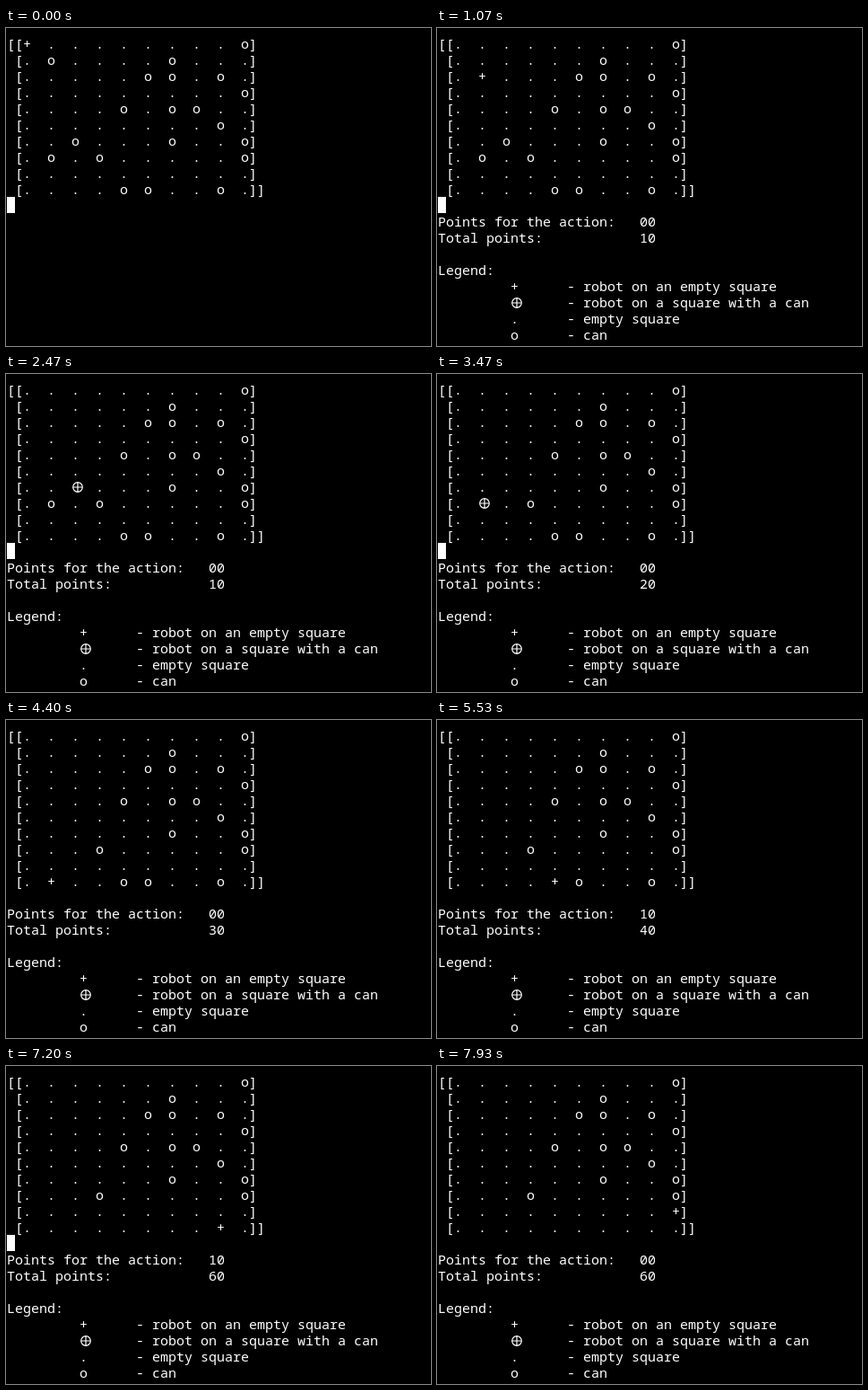
An HTML page with a canvas for the animation above (8 s loop, 474 by 354 pixels).

```html
<!DOCTYPE html>
<html lang="en">
<head>
<meta charset="utf-8">
<title>Can collecting robot</title>
<style>
html, body { margin: 0; width: 100%; height: 100%; overflow: hidden; background: #000; }
canvas { display: block; }
</style>
</head>
<body>
<canvas id="stage" width="474" height="354"></canvas>
<script>
const ctx = document.getElementById('stage').getContext('2d', { alpha: false });
const LOOP = 8000, CELL = 9, LINE = 18, LEFT = 1, TOP = 8, SIZE = 10;

// Columns holding a can, one string per grid row
const CANS = ['9', '16', '568', '9', '467', '8', '269', '139', '', '458'];

// Right, left, down, up or pick, each with its start time
const ACTIONS = 'RDPDDDDDRPDLPDDRRRPRPRRRPRU';
const TIMES = [130, 400, 870, 1070, 1330, 1670, 1930, 2200, 2470,
  2730, 3000, 3270, 3530, 3800, 4130, 4670, 4930, 5200, 5470,
  5730, 6000, 6270, 6530, 6800, 7070, 7330, 7600];
const MOVES = { R: [0, 1], L: [0, -1], D: [1, 0], U: [-1, 0] };

function stateAt(t) {
  const cans = CANS.map(row => new Set([...row].map(Number)));
  let row = 0, col = 0, points = 0, total = 0;
  for (let i = 0; i < TIMES.length && TIMES[i] <= t; i++) {
    const action = ACTIONS[i];
    points = 0;
    if (action === 'P') {
      cans[row].delete(col);
      points = 10;
      total += points;
    } else {
      row += MOVES[action][0];
      col += MOVES[action][1];
    }
  }
  return { cans, row, col, points, total };
}

function print(text, row, col) {
  [...text].forEach((ch, i) => {
    const x = LEFT + (col + i) * CELL;
    if (ch === '⊕') robotOnCan(x + 7, TOP + row * LINE + 10);
    else if (ch !== ' ') ctx.fillText(ch, x, TOP + row * LINE + 15);
  });
}

function robotOnCan(x, y) {
  ctx.beginPath();
  ctx.arc(x, y, 5.3, 0, Math.PI * 2);
  ctx.moveTo(x - 5, y);
  ctx.lineTo(x + 5, y);
  ctx.moveTo(x, y - 5);
  ctx.lineTo(x, y + 5);
  ctx.stroke();
}

function drawGrid({ cans, row, col }) {
  for (let r = 0; r < SIZE; r++) {
    print(r ? ' [' : '[[', r, 0);
    for (let c = 0; c < SIZE; c++) {
      const can = cans[r].has(c), robot = r === row && c === col;
      print(robot ? (can ? '⊕' : '+') : can ? 'o' : '.', r, 2 + 3 * c);
    }
    print(r === SIZE - 1 ? ']]' : ']', r, 30);
  }
}

function drawInfo({ points, total }) {
  const pad = n => String(n).padStart(2, '0');
  print('Points for the action:   ' + pad(points), 11, 0);
  print('Total points:            ' + pad(total), 12, 0);
  print('Legend:', 14, 0);
  [
    ['+', 'robot on an empty square'],
    ['⊕', 'robot on a square with a can'],
    ['.', 'empty square'],
    ['o', 'can']
  ].forEach(([mark, label], i) => {
    print(mark, 15 + i, 9);
    print('- ' + label, 15 + i, 16);
  });
}

function draw(t) {
  const state = stateAt(t);
  ctx.fillStyle = '#000';
  ctx.fillRect(0, 0, 474, 354);
  ctx.fillStyle = ctx.strokeStyle = '#fff';
  ctx.lineWidth = 1.2;
  ctx.font = '15px "Noto Sans Mono", "DejaVu Sans Mono", monospace';
  drawGrid(state);
  if (t >= 70) drawInfo(state);
  // The cursor blinks 600 ms on, 600 ms off
  if ((t + 330) % 1200 < 600) ctx.fillRect(LEFT, TOP + SIZE * LINE, CELL, LINE);
}

const start = performance.now();
function tick(now) {
  draw(Math.max(0, now - start) % LOOP);
  requestAnimationFrame(tick);
}
draw(0);
requestAnimationFrame(tick);
</script>
</body>
</html>
```
